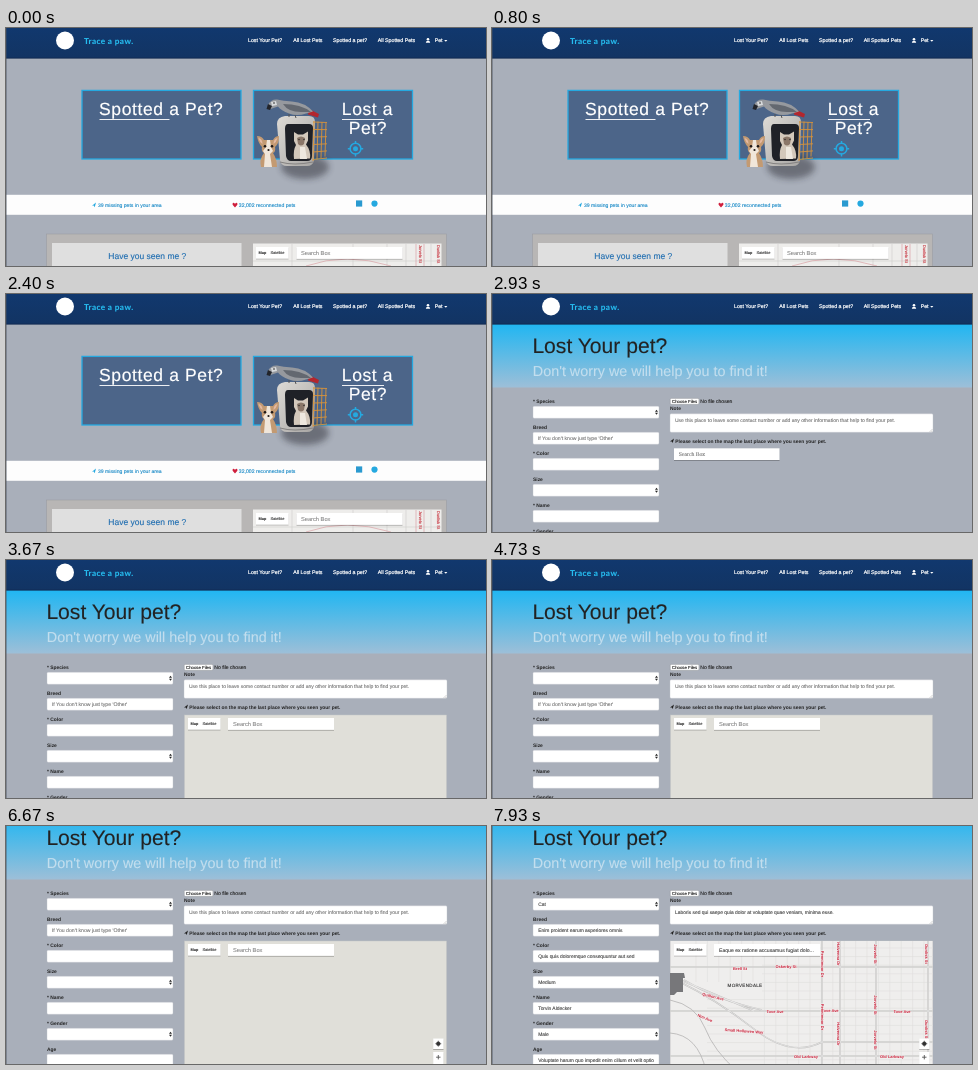
Write an HTML page that moves like this. It is 480 by 238 pixels and loops after 8 s.

```html
<!DOCTYPE html>
<html lang="en">
<head>
<meta charset="utf-8">
<title>Pet finder</title>
<style>
html, body { margin: 0; width: 100%; height: 100%; overflow: hidden; background: #a9afba; }
svg { display: block; width: 100%; height: 100%; }
text { font-family: "Liberation Sans", Arial, sans-serif; text-rendering: geometricPrecision; white-space: pre; }
</style>
</head>
<body>
<svg id="stage" viewBox="0 0 480 238" xmlns="http://www.w3.org/2000/svg"></svg>
<script>
const LOOP = 8000, CYAN = '#25a9e0', PAPER = '#a9afba', SMALL = 4.92;
const T = { form: 2750, map: 3200, scroll: 4790, scrolled: 5010, fill: 7330, tiles: 7600 };

// Later duplicates of an attribute are ignored, so "more" can override the stroke.
const text = (x, y, size, str, fill = '#222', more = '') =>
  `<text x="${x}" y="${y}" font-size="${size}" fill="${fill}" ${more} stroke="${fill}" stroke-width=".12">${str}</text>`;
const rect = (x, y, w, h, fill, more = '') =>
  `<rect x="${x}" y="${y}" width="${w}" height="${h}" fill="${fill}" ${more}/>`;
const path = (d, fill, more = '') => `<path d="${d}" fill="${fill}" ${more}/>`;
const line = (d, stroke, width) => path(d, 'none', `stroke="${stroke}" stroke-width="${width}"`);
const circle = (x, y, r, fill, more = '') => `<circle cx="${x}" cy="${y}" r="${r}" fill="${fill}" ${more}/>`;
const group = (id, ...parts) => `<g id="${id}">${parts.join('')}</g>`;
const bold = 'font-weight="bold" stroke="none"', middle = 'text-anchor="middle"';
const shade = 'filter="url(#shade)"';
const plane = (x, y, fill) => path(`M${x} ${y + 2.4}l4 -3.2l-1.3 4.6l-1 -1.6z`, fill);

const defs = `<defs>
  <linearGradient id="sky" x2="0" y2="1"><stop stop-color="#20b6f2"/><stop offset="1" stop-color="#9dbfd8"/></linearGradient>
  <linearGradient id="nav" x2="0" y2="1"><stop stop-color="#11386e"/><stop offset="1" stop-color="#123463"/></linearGradient>
  <linearGradient id="shell" x2="1" y2="1"><stop stop-color="#dedbd6"/><stop offset="1" stop-color="#a7a5a3"/></linearGradient>
  <filter id="shade" x="-10%" y="-20%" width="120%" height="150%"><feDropShadow dx="0" dy=".7" stdDeviation=".7" flood-opacity=".35"/></filter>
  <filter id="soft" x="-40%" y="-40%" width="180%" height="180%"><feGaussianBlur stdDeviation="3"/></filter>
  <clipPath id="mapBox"><rect x="178.5" y="155" width="262" height="130"/></clipPath>
  <clipPath id="column"><rect x="41" y="100" width="125" height="190"/></clipPath>
</defs>`;

function header() {
  const links = [[242, 'Lost Your Pet?'], [287.3, 'All Lost Pets'], [327, 'Spotted a pet?'], [371.8, 'All Spotted Pets'], [428.7, 'Pet']];
  return rect(0, 0, 480, 30, 'url(#nav)') + rect(0, 29.6, 480, 1, '#0f2a50') +
    circle(59, 12.5, 9, '#fff') +
    text(78, 16.3, 8.2, 'Trace a paw.', '#27bdf0', 'style="font-family:Lato,sans-serif" font-weight="700" letter-spacing=".4"') +
    links.map(([x, s]) => text(x, 14.4, 5.25, s, '#fff', 'stroke-width=".22"')).join('') +
    circle(422, 11.2, 1.3, '#fff') + path('M419.8 14.8q0 -2 2.2 -2t2.2 2z', '#fff') +
    path('M438.2 12h3.2l-1.6 1.8z', '#fff');
}

function mapControls(x, y, searchX) {
  return rect(x, y, 32.5, 11.5, '#fff', shade) +
    text(x + 2.6, y + 7.2, 3.9, 'Map', '#111', bold) + text(x + 14.5, y + 7.2, 3.9, 'Satellite', '#333') +
    rect(searchX, y, 106, 11.8, '#fff', shade);
}

function animals() {
  const bars = [0, 1, 2, 3].map(i => `M${308 + i * 4} ${93 + i * .5}l-1 ${40 - i * 2}`).join('') +
    [0, 1, 2, 3, 4, 5].map(i => `M307 ${94 + i * 7.5}l14 ${.5 - i * .4}`).join('');
  return `<ellipse cx="299" cy="139" rx="24" ry="12" fill="#20242c" opacity=".45" filter="url(#soft)"/>` +
    // carrier
    path('M279 88h24q6 0 6 6l-1 38q-1 6 -7 6h-20q-6 0 -7 -6l-3 -36q0 -7 8 -8z', 'url(#shell)') +
    path('M282 96h21q4 0 4 4l-1 28q0 5 -5 5h-16q-4 0 -5 -5l-1 -27q0 -5 3 -5z', '#1f2127') +
    line('M274 134q14 4 33 0', '#858382', 1.2) + line(bars, '#d9933a', .9) +
    // cat
    path('M288 131q-1 -9 2 -14l-2 -4v-9l4 2.5h5l5 -3v9l-2 4q5 6 4 14z', '#d3c8bb') +
    path('M291 110q4 -3 8 0l-1 6q-3 3 -6 0z', '#8b7769') +
    path('M294 119h5l2 12h-7z', '#eee8df') +
    circle(293, 111.5, .7, '#222') + circle(298, 111.5, .7, '#222') +
    // dog
    path('M251 108q5 0 7 4h9q2 -4 6 -4q0 8 -4 11q1 5 -2 6q4 6 4 14h-16q-2 -8 3 -14q-3 -2 -2 -6q-4 -4 -5 -11z', '#c39a72') +
    path('M252.5 110q4 1 4 6q-3 -2 -4 -6zM271.5 110q-4 1 -4 6q3 -2 4 -6z', '#e5b9a2') +
    path('M261 112h3l1 7l2 4l-3 3l2 13h-8l1 -13l-2 -3l3 -4z', '#f0e6da') +
    circle(259, 118.3, 1.3, '#1c1614') + circle(266, 118.3, 1.3, '#1c1614') + circle(262.5, 122, 1.1, '#1c1614') +
    // parrot
    path('M303 81l10 5l-1 3.5l-10 -3z', '#b3262d') +
    path('M262 77q3 -6 9 -5.5q6 1.5 15 2q13 1 21 10l-7 2q-9 3 -17 0q-8 -3 -11 -7l-6 2q-3 1 -4 -3.5z', '#96999e') +
    path('M277 76q18 0 28 8l-10 0q-13 0 -18 -8z', '#636870') +
    path('M262 76l-1.5 5l3.5 1l2 -4z', '#22242a') + path('M265 74l5 -1l1 4l-5 1z', '#d8dadc') + circle(268, 75, .8, '#222') +
    line('M283 86v3M289 87l1 3', '#555', 1);
}

function home() {
  const big = 'letter-spacing=".62" stroke-width=".2"';
  const card = x => rect(x, 62.4, 159, 68.6, '#4c6589', `stroke="${CYAN}" stroke-width="1.3"`);
  return rect(0, 30, 480, 208, PAPER) + card(76) + card(247.5) +
    text(93, 87, 17.5, 'Spotted a Pet?', '#fff', big) + rect(93.5, 91, 70, .9, '#fff') +
    text(335.8, 87, 17.5, 'Lost a', '#fff', big) + rect(336, 91, 42, .9, '#fff') +
    text(342.7, 105.8, 17.5, 'Pet?', '#fff', big) +
    circle(349.5, 120.7, 5.4, 'none', `stroke="${CYAN}" stroke-width="1.5"`) + circle(349.5, 120.7, 2.5, CYAN) +
    line('M349.5 113v3M349.5 125.5v3M341.8 120.7h3M354.2 120.7h3', CYAN, 1.5) +
    animals() +
    rect(0, 166.8, 480, 20, '#fdfdfd') + plane(86, 175.4, CYAN) +
    text(92, 178.7, 5.1, '39 missing pets in your area', '#1688c6') +
    path('M229 179.6l-2.4 -2.8q-.4 -2.2 1.2 -2l1.2 .9l1.2 -.9q1.6 -.2 1.2 2z', '#cf1f3d') +
    text(232.8, 178.7, 5.15, '32,002 reconnected pets', '#1688c6') +
    rect(350, 172.4, 6.2, 6.2, '#2a9ad0') + circle(368.5, 175.6, 3.1, CYAN) +
    rect(40.5, 206, 400, 40, '#b8b6b5', 'stroke="#9b9da2" stroke-width=".6"') +
    rect(46, 215, 189.5, 30, '#dfdfdf') + text(141.3, 231.2, 8.5, 'Have you seen me ?', '#1d6cb0', middle) +
    rect(247, 215.5, 188.5, 30, '#eeedeb') +
    line('M247 233h188M286 216v22M347 216v22M381 216v22M400 216v22M425 216v22', '#d2d0ce', .7) +
    line('M300 238q40 -14 85 0M410 216v22M418 216v22', '#d7969b', .6) +
    text(0, 0, 4, 'Jorvelo St', '#c8343f', 'transform="translate(413.2 217) rotate(90)"') +
    text(0, 0, 4, 'Dunlisk St', '#c8343f', 'transform="translate(430.5 217) rotate(90)"') +
    mapControls(250, 219, 290.5) + text(295, 227, 5.7, 'Search Box', '#8a8a8a');
}

const fields = [
  ['* Species', 'Cat', 1], ['Breed', 'Enim proident earum asperiores omnis'],
  ['* Color', 'Quis quis doloremque consequuntur aut sed'], ['Size', 'Medium', 1],
  ['* Name', 'Torvin Aldecker'], ['* Gender', 'Male', 1],
  ['Age', 'Voluptate harum quo impedit enim cillum et velit optio']
];
const input = (x, y, w, h) => rect(x, y, w, h, '#fff', 'rx="1.2" stroke="#c3c6cc" stroke-width=".4"');

function form() {
  const rows = fields.map(([label, , select], i) => {
    const y = 108.8 + i * 26;
    return text(41, y, SMALL, label, '#222', bold) + input(41, y + 3.5, 126, 12) +
      (select ? path(`M163 ${y + 8.9}l1.5 -2l1.5 2zM163 ${y + 10}l1.5 2l1.5 -2z`, '#222') : '');
  }).join('');
  return rect(0, 30, 480, 270, PAPER) + rect(0, 30, 480, 63.5, 'url(#sky)') +
    text(40.4, 58.7, 21.1, 'Lost Your pet?') +
    text(40.8, 81.8, 14.36, 'Don\'t worry we will help you to find it!', '#c3deee') + rows +
    rect(178.3, 104.4, 28.6, 5.9, '#fff', 'rx="1" stroke="#888" stroke-width=".35"') +
    text(192.6, 108.9, 4.3, 'Choose Files', '#111', middle) + text(208.3, 108.8, 5.05, 'No file chosen') +
    text(178, 116.2, SMALL, 'Note', '#222', bold) + input(178, 119.8, 263, 18.5) +
    path('M437.5 138l3 -3M439.3 138l1.2 -1.2', 'none', 'stroke="#999" stroke-width=".4"') +
    plane(178, 145.2, '#222') +
    text(183.3, 149.1, SMALL, 'Please select on the map the last place where you seen your pet.', '#222', bold);
}

function hints() {
  return text(45.8, 146.3, 5.15, 'If You don\'t know just type \'Other\'', '#777') +
    text(183, 127.7, 5, 'Use this place to leave some contact number or add any other information that help to find your pet.', '#777');
}

function values() {
  return '<g clip-path="url(#column)">' +
    fields.map(([, value], i) => text(46.2, 120.2 + i * 26, SMALL, value, '#444')).join('') + '</g>' +
    text(183, 127.7, SMALL, 'Laboris sed qui saepe quia dolor at voluptate quae veniam, minima esse.', '#444');
}

function tiles() {
  let minor = '', x, y;
  for (x = 204; x < 441; x += 11.4) minor += `M${x} ${x < 270 ? 155 : 150}V${x < 270 ? 196 : 285}`;
  for (y = 162; y < 285; y += 8.6) minor += `M${y < 205 ? 270 : 215} ${y}H441`;
  const roads = 'M178 181H441M178 225H441M178 270H441M192 194Q225 214 270 224M178 190L215 205L262 225' +
    'M186 195Q225 214 262 243T330 256H441M330 155V285M348 155V285M384 155V285M436 155V285';
  const names = [
    [248, 182.4, 0, 'Brell St'], [294, 180.8, 0, 'Oskerby St'],
    [221, 210.6, 14, 'Quillon Ave'], [213, 232, 22, 'Nim Ave'], [283, 225.5, 0, 'Tove Ave'],
    [338, 225, 0, 'Tove Ave'], [410, 225.5, 0, 'Tove Ave'], [252, 245, 4, 'Small Hollowen Way'],
    [314, 271, 0, 'Old Larkway'], [400, 271, 0, 'Old Larkway'],
    [330, 178, 90, 'Pennimoor Dr'], [330, 231, 90, 'Pennimoor Dr'],
    [346.5, 168, 90, 'Halvenna Dr'], [346.5, 248, 90, 'Halvenna Dr'],
    [383, 168, 90, 'Jorvelo St'], [383, 219, 90, 'Jorvelo St'], [383, 254, 90, 'Jorvelo St'],
    [434, 168, 90, 'Dunlisk St'], [434, 244, 90, 'Dunlisk St']
  ];
  return '<g clip-path="url(#mapBox)">' + rect(178.5, 155, 262, 130, '#efeeed') +
    line(minor, '#dfdedc', .6) + line(roads, '#bdbcbb', 1.5) + line(roads, '#f7f7f6', .6) +
    path('M178 187h14l1 5h-2v14h-6l-3 3h-4z', '#77777a') +
    line('M178 214q26 5 35 28T245 285M178 247q28 2 36 38', '#b4b3b3', .8) +
    names.map(([x, y, turn, s]) => text(0, 1.4, 4, s, '#c9203a',
      `${middle} font-weight="bold" stroke="#f5f3f2" stroke-width=".8" paint-order="stroke" transform="translate(${x} ${y}) rotate(${turn})"`)).join('') +
    text(253, 200.6, 4.5, 'MORVENDALE', '#333', middle + ' letter-spacing=".35"') + '</g>';
}

function mapTools() {
  return mapControls(182, 158, 222) +
    rect(427.2, 252.5, 10.3, 10.5, '#fff', shade) + rect(427.2, 266, 10.3, 14, '#fff', shade) +
    circle(432.3, 257.7, 1.9, '#333', 'stroke="#333" stroke-width=".5"') +
    line('M432.3 254.7v6M429.3 257.7h6', '#333', .6) + line('M432.3 269v4.4M430.1 271.2h4.4', '#555', .9);
}

document.getElementById('stage').innerHTML = defs + group('view',
  group('home', home()),
  group('form', form(),
    group('hints', hints()),
    group('plain', rect(182, 154.3, 105.5, 11.7, '#fff', shade) +
      text(186.8, 162, 5.7, 'Search Box', '#777', 'style="font-family:\'Liberation Serif\',serif"')),
    group('map', rect(178.5, 155, 262, 130, '#e0dfd9', 'stroke="#c4c5c5" stroke-width=".5"'),
      group('tiles', tiles()), mapTools(),
      group('ask', text(227, 166, 5.7, 'Search Box', '#8a8a8a')),
      group('answer', text(227, 166, 5.1, 'Eaque ex ratione accusamus fugiat dolo...', '#444'))),
    group('values', values())),
  header()
) + rect(0, 0, .8, 238, '#4a5362', 'opacity=".55"');

const play = (id, frames) => document.getElementById(id).animate(frames, { duration: LOOP, iterations: Infinity });

// Visible from one time to another, with hard cuts.
function show(id, from, to = LOOP) {
  const frames = [];
  for (const [a, b, on] of [[0, from, 0], [from, to, 1], [to, LOOP, 0]])
    if (b > a) frames.push({ offset: a / LOOP, opacity: on }, { offset: b / LOOP, opacity: on });
  play(id, frames);
}

show('home', 0, T.form);
show('form', T.form);
show('plain', T.form, T.map);
show('map', T.map);
show('hints', T.form, T.fill);
show('values', T.fill);
show('ask', T.map, T.fill);
show('answer', T.fill);
show('tiles', T.tiles);
play('view', [
  { offset: 0, transform: 'translateY(0px)' },
  { offset: T.scroll / LOOP, transform: 'translateY(0px)', easing: 'ease-in-out' },
  { offset: T.scrolled / LOOP, transform: 'translateY(-40px)' },
  { offset: 1, transform: 'translateY(-40px)' }
]);
</script>
</body>
</html>
```
